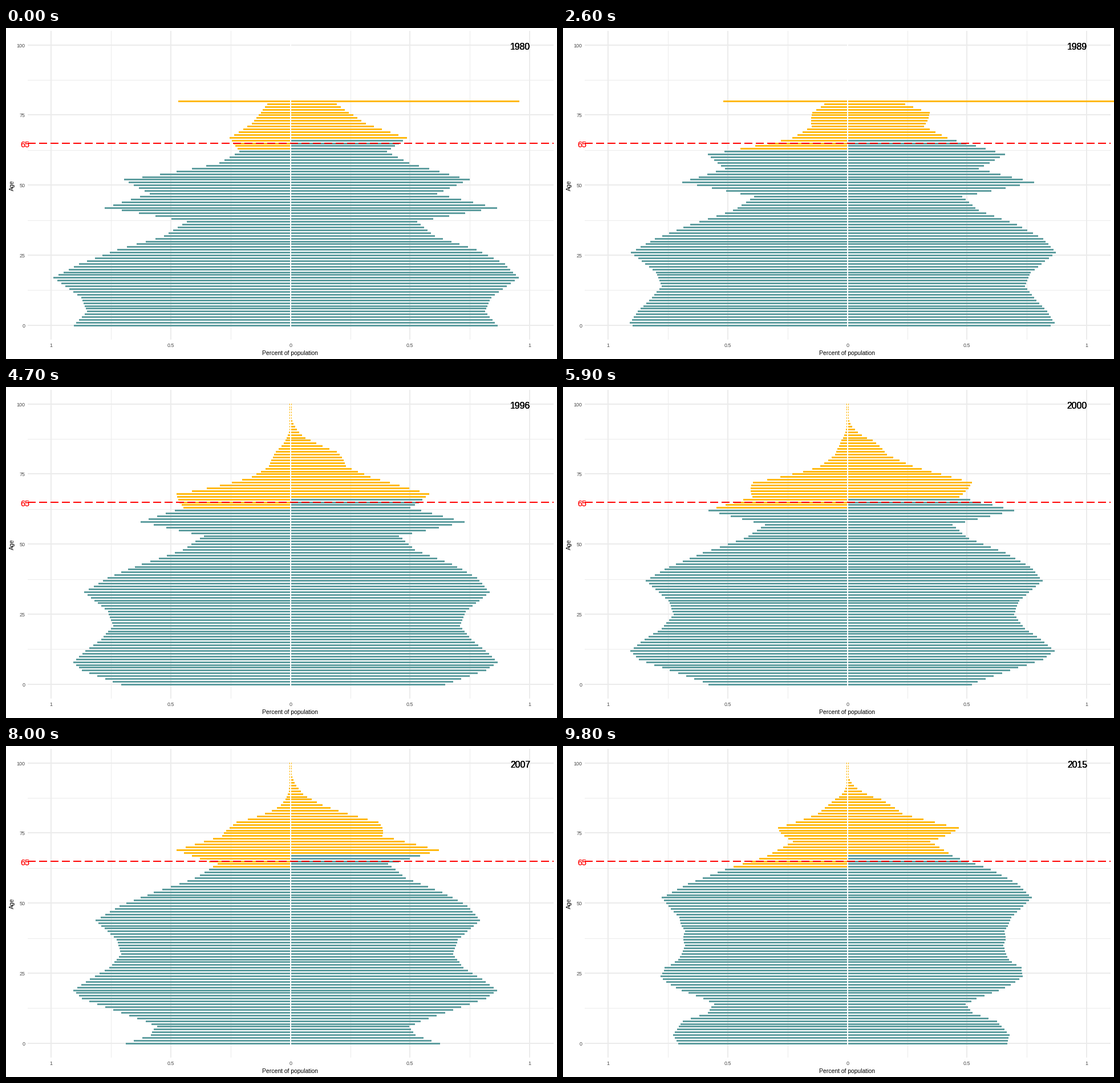
A matplotlib script for the animation above (10000 ms loop, 966 by 580 pixels).

```python
import numpy as np
import matplotlib.pyplot as plt
from matplotlib.animation import FuncAnimation
from matplotlib.collections import PolyCollection
from matplotlib.patches import Rectangle

W, H, DPI = 966, 580, 64
PT = 72 / DPI                      # points per pixel
TEAL, AMBER, GRID, GREY = "#5F9EA0", "#FFB90F", "#EBEBEB", "#4D4D4D"
MID, UNIT = 498.6, 419.8           # pixel of 0 %, pixels per 1 %
LEFT, RIGHT, TOP, BOTTOM = 38, 960, 5, 546
FIRST, SPLIT = 1980, 1990          # ages above 80 are pooled before SPLIT

# Peaks and dips by birth year since 1900: size of the female cohort in pixels
COHORTS = [(-20, 3), (-8, 25), (1, 81), (8, 132), (13, 204), (18, 169),
           (22, 208), (28, 314), (33, 257), (38, 362), (43, 222), (48, 253),
           (53, 326), (58, 376), (63, 400), (70, 352), (75, 341), (80, 363),
           (84, 366), (88, 363), (91, 343), (99, 228), (101, 208), (104, 219),
           (107, 262), (112, 284), (115, 280)]
# Men per woman, by the same birth years
MEN_RATIO = [(1, 0.5), (18, 0.53), (22, 0.6), (28, 0.93), (33, 0.96),
             (38, 0.9), (43, 0.82), (63, 1.04), (88, 1.05), (102, 1.13),
             (115, 1.06)]
# Cumulative mortality: hazard at age 82 and years per factor e
MORTALITY = {"men": (1.4, 9), "women": (0.8, 8)}
# Pooled bar at age 80: start and growth per year
POOLED = {"men": (197, 2.3), "women": (401, 13.5)}


def curve(x, points):
    return np.interp(x, *zip(*points))


def lengths(sex, year):
    """Bar lengths in pixels for ages 0, 1, 2, ..."""
    t = year - FIRST
    age = np.arange(101)
    born = year - 1900 - age
    size = curve(born, COHORTS)
    if sex == "men":
        size = size * curve(born, MEN_RATIO)

    hazard, span = MORTALITY[sex]
    deaths = hazard * (np.exp((age - 82) / span) - np.exp((age - t - 82) / span))
    # Older cohorts lose share as the total grows; young adults leave late on
    older = np.clip((88 - born) / 8, 0, 1)
    drift = 1 - 0.2 * older * (1 - np.exp(-t / 16))
    leaving = 0.17 * np.exp(-((born - 86) / 7) ** 2) * np.clip((year - 2008) / 7, 0, 1)
    size = np.maximum(size * np.exp(-deaths) * drift * (1 - leaving), 2)

    if year < SPLIT:
        start, growth = POOLED[sex]
        size = np.append(size[:80], start + growth * t)
    return size


def age_row(age):
    return int(521.4 - 4.913 * age)


def pyramid(year):
    """Rectangles and colours of all bars."""
    rects, colors = [], []
    for sex, side, old in (("men", -1, 63), ("women", 1, 67 if year < 2004 else 68)):
        for age, size in enumerate(lengths(sex, year)):
            y, tip = age_row(age), round(MID + side * size)
            rects.append([(499, y - 1), (tip, y - 1), (tip, y + 2), (499, y + 2)])
            colors.append(AMBER if age >= old else TEAL)
    return rects, colors


def year_at(i):
    return FIRST + ((i + 1) // 3 if i < 86 else 29 + (i - 86) // 2)


plt.rcParams["font.family"] = "Liberation Sans"
fig = plt.figure(figsize=(W / DPI, H / DPI), dpi=DPI, facecolor="white")
ax = fig.add_axes([0, 0, 1, 1])
ax.set(xlim=(0, W), ylim=(H, 0))
ax.axis("off")


def box(x0, y0, x1, y1, color, z):
    ax.add_patch(Rectangle((x0, y0), x1 - x0, y1 - y0, color=color, lw=0,
                           antialiased=False, zorder=z))


def label(x, y, text, size, color="black", ha="center"):
    """Text whose capitals are centred on y."""
    return ax.text(x, y + 0.36 * size, text, size=size * PT, color=color,
                   ha=ha, va="baseline", zorder=6)


# Grid: even steps are major lines, two pixels wide and labelled
for q in range(-4, 5):
    x, major = round(MID + q * UNIT / 4), q % 2 == 0
    box(x - major, TOP, x + 1, BOTTOM, GRID, 1)
    if major:
        label(x, 556.2, f"{abs(q) / 4:g}", 9, GREY)
for q in range(9):
    y, major = age_row(12.5 * q), q % 2 == 0
    box(LEFT, y - major, RIGHT, y + 1, GRID, 1)
    if major:
        label(33.5, y + 1, f"{12.5 * q:g}", 9, GREY, "right")

bars = PolyCollection([], antialiased=False, linewidths=0, zorder=3)
ax.add_collection(bars, autolim=False)
box(498, TOP, 500, BOTTOM, "white", 4)

limit = age_row(65)
for x in range(LEFT, RIGHT, 20):
    box(x, limit - 1, min(x + 14, RIGHT), limit + 1, "red", 5)

label(498.3, 569.7, "Percent of population", 10.4)
ax.text(11, 276, "Age", size=10.4 * PT, rotation=90, ha="center", va="center")

# Stacked copies give the heavy look of overprinted text
for _ in range(2):
    label(33, 204, "65", 14.4, "red")
stamps = [label(919, 32, "", 15.8, ha="right") for _ in range(4)]


def draw(i):
    year = year_at(i)
    rects, colors = pyramid(year)
    bars.set_verts(rects)
    bars.set_facecolor(colors)
    for stamp in stamps:
        stamp.set_text(str(year))
    return [bars, *stamps]


anim = FuncAnimation(fig, draw, frames=100, interval=100, repeat=True,
                     repeat_delay=0, blit=False)
plt.show()
```
